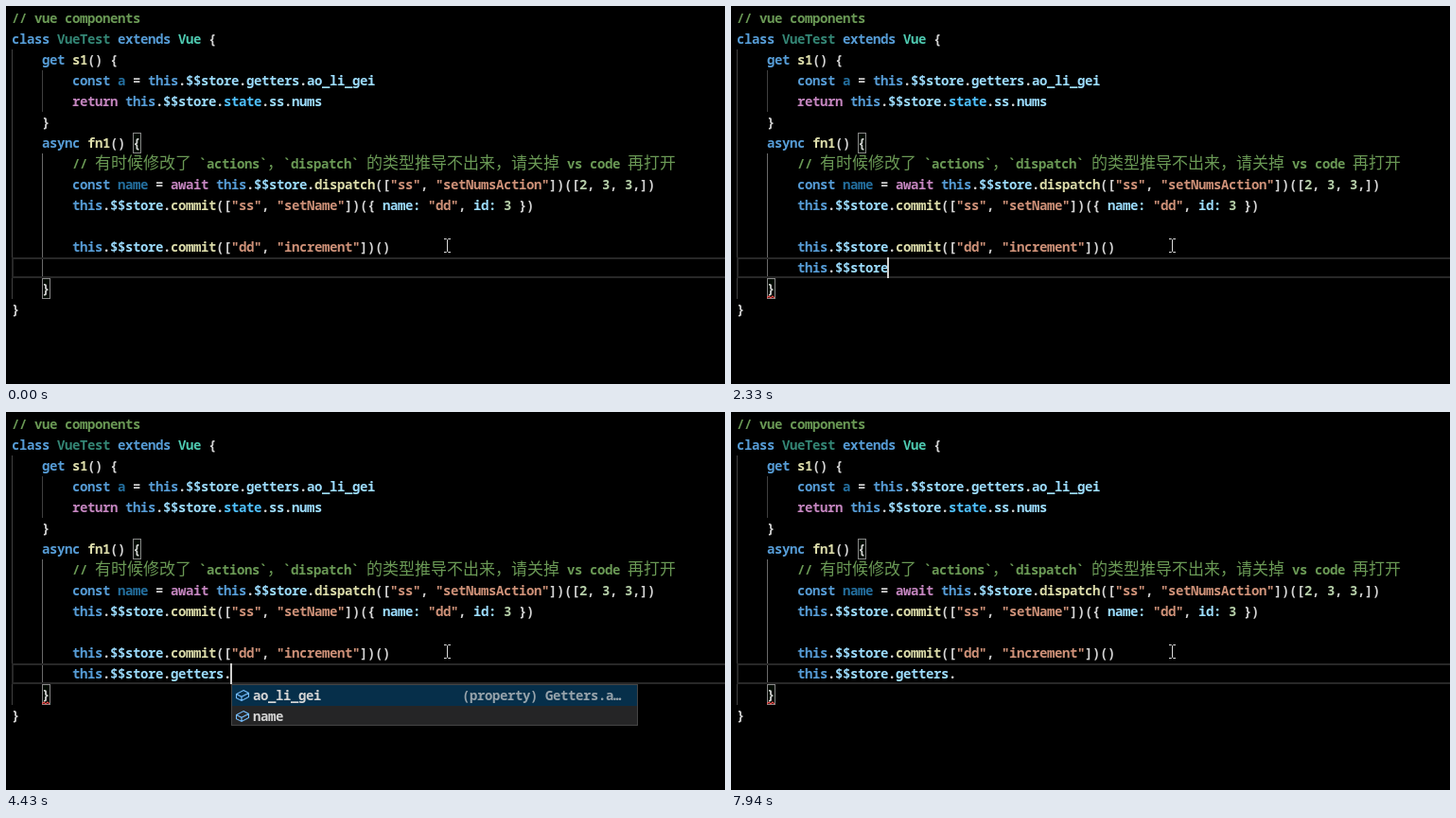
An HTML page for the animation above (8000 ms loop, 760 by 400 pixels).

```html
<!DOCTYPE html>
<html lang="zh-CN">
<head>
<meta charset="utf-8">
<title>Typed store completion</title>
<style>
html, body { margin: 0; width: 100%; height: 100%; overflow: hidden; background: #000; }
#stage {
  position: relative; width: 760px; height: 400px; overflow: hidden; background: #000; color: #d4d4d4;
  font: 700 14px/22px "Noto Sans Mono", "DejaVu Sans Mono", monospace;
  letter-spacing: -.4px; white-space: pre; font-variant-ligatures: none;
}
#stage > *, .row > * { position: absolute; }
#code { left: 6px; top: 2px; }
#code div { height: 22px; }
i { font-style: normal; }
.c { color: #6a9955; } .k { color: #569cd6; } .r { color: #c586c0; }
.t { color: #4ec9b0; } .f { color: #dcdcaa; } .v { color: #9cdcfe; }
.s { color: #ce9178; } .n { color: #b5cea8; } .o { color: #4fc1ff; }
.dim { opacity: .667; }
.d { color: #2470a0; }
.zh { font: 400 17px/0 "Noto Sans CJK SC", "Noto Sans CJK", sans-serif; letter-spacing: 0; }
.guide { width: 1px; background: #404040; }
.on { background: #6a6a6a; }
#current { left: 6px; top: 266px; width: 780px; height: 22px; box-sizing: border-box; border: 2px solid #282828; }
.match { width: 9px; height: 22px; box-sizing: border-box; border: 1px solid #888; background: rgba(0, 100, 0, .1); }
.word { width: 72px; height: 22px; background: rgba(87, 87, 87, .72); }
#typed { left: 70px; top: 266px; }
#caret { top: 266px; width: 2px; height: 22px; background: #d0d0ce; }
#squiggle { left: 38px; top: 306px; }
.popup {
  top: 288px; width: 430px; box-sizing: border-box; overflow: hidden;
  background: #252526; border: 1px solid #454545;
}
.row { position: relative; height: 22px; }
.row:first-child { background: #062f4a; }
.row svg { left: 3px; top: 3px; }
.label { left: 22px; }
.label i { color: #0097fb; }
.detail { left: 243px; opacity: .7; }
svg { fill: none; }
</style>
</head>
<body>
<div id="stage">
  <div class="guide" style="left:6px;top:46px;height:264px"></div>
  <div class="guide" style="left:38px;top:68px;height:44px"></div>
  <div class="guide on" style="left:38px;top:156px;height:132px"></div>
  <div id="current"></div>
  <div class="match" style="left:134px;top:134px"></div>
  <div class="match" style="left:38px;top:288px"></div>
  <div class="word" style="left:318px;top:68px"></div>
  <div class="word" style="left:238px;top:266px"></div>
  <div id="code"><div class="c">// vue components</div><div><i class="k">class</i> <i class="t dim" id="name">VueTest</i> <i class="k">extends</i> <i class="t">Vue</i> {</div><div>    <i class="k">get</i> <i class="f">s1</i>() {</div><div>        <i class="k">const</i> <i class="d">a</i> = <i class="k">this</i>.<i class="v">$$store</i>.<i class="v">getters</i>.<i class="v">ao_li_gei</i></div><div>        <i class="r">return</i> <i class="k">this</i>.<i class="v">$$store</i>.<i class="o">state</i>.<i class="v">ss</i>.<i class="v">nums</i></div><div>    }</div><div>    <i class="k">async</i> <i class="f">fn1</i>() {</div><div class="c">        // <i class="zh">有时候修改了</i> `actions`<i class="zh">，</i>`dispatch` <i class="zh">的类型推导不出来，请关掉</i> vs code <i class="zh">再打开</i></div><div>        <i class="k">const</i> <i class="d">name</i> = <i class="r">await</i> <i class="k">this</i>.<i class="v">$$store</i>.<i class="f">dispatch</i>([<i class="s">"ss"</i>, <i class="s">"setNumsAction"</i>])([<i class="n">2</i>, <i class="n">3</i>, <i class="n">3</i>,])</div><div>        <i class="k">this</i>.<i class="v">$$store</i>.<i class="f">commit</i>([<i class="s">"ss"</i>, <i class="s">"setName"</i>])({ <i class="v">name:</i> <i class="s">"dd"</i>, <i class="v">id:</i> <i class="n">3</i> })</div><div></div><div>        <i class="k">this</i>.<i class="v">$$store</i>.<i class="f">commit</i>([<i class="s">"dd"</i>, <i class="s">"increment"</i>])()</div><div></div><div>    }</div><div>}</div></div>
  <div id="typed"></div>
  <svg id="squiggle" width="8" height="4"><path d="M0 3 L2 1 L4 3 L6 1 L8 3" stroke="#f14c4c" stroke-width="1.2"/></svg>
  <div id="caret"></div>
  <svg style="left:461px;top:245px" width="11" height="17"><path d="M2 1.5H4.5L5.5 2.5L6.5 1.5H9M5.5 2.5V14.5M2 15.5H4.5L5.5 14.5L6.5 15.5H9" stroke="#ddd"/></svg>
</div>
<script>
const stage = document.getElementById('stage');
const $ = id => document.getElementById(id);

const icon = (color, d) =>
  `<svg width="16" height="16" viewBox="0 0 16 16"><path d="${d}" stroke="${color}" stroke-width="1.1"/></svg>`;
const icons = {
  k: icon('#c5c5c5', 'M1 3.5H6M8 3.5H15M1 6.5H10M12 6.5H14M1 9.5H4M6 9.5H14M1 12.5H9M11 12.5H15'),
  n: icon('#c5c5c5', 'M5.5 2.5Q3.5 2.5 3.5 4.5V6.5L1.5 8L3.5 9.5V11.5Q3.5 13.5 5.5 13.5M10.5 2.5Q12.5 2.5 12.5 4.5V6.5L14.5 8L12.5 9.5V11.5Q12.5 13.5 10.5 13.5'),
  v: icon('#75beff', 'M4 3.5H1.5V12.5H4M12 3.5H14.5V12.5H12M9 5L12 6.5V8.5L7.5 11L4.5 9.5V7.5ZM4.5 7.5L7.5 9L12 6.5M7.5 9V11'),
  p: icon('#75beff', 'M9 2.5L14.5 5.3V9.5L7 13.5L1.5 10.7V6.5ZM1.5 6.5L7 9.3L14.5 5.3M7 9.3V13.5'),
  m: icon('#b180d7', 'M8 1.5L13.5 4.5V11L8 14.5L2.5 11V4.5ZM2.5 4.5L8 7.8L13.5 4.5M8 7.8V14.5')
};

// Each item is "icon:label"; brackets mark the matched letters.
const lists = {
  th: ['this', 'k:[th]is k:[th]row n:global[Th]is v:[T]ouc[h] v:[T]ouc[h]Event v:[T]ouc[h]List'],
  thi: ['this', 'k:[thi]s n:global[Thi]s v:[T]ouc[h]L[i]st'],
  full: ['this', 'k:[this] n:global[This] v:[T]ouc[h]L[is]t'],
  self: ['(property) VueTest.$…', 'p:$$store p:$attrs p:$children p:$createElement p:$data m:$delete'],
  store: ['(property) SStore<Re…', 'p:commit p:dispatch p:getters m:hasModule m:hotUpdate m:registerModule'],
  g: ['(property) SStore<Re…', 'p:[g]etters m:re[g]isterModule m:unre[g]isterModule'],
  ge: ['(property) SStore<Re…', 'p:[ge]tters m:re[g]ist[e]rModule m:unre[g]ist[e]rModule'],
  get: ['(property) SStore<Re…', 'p:[get]ters m:re[g]ist[e]rModule m:unre[g]ist[e]rModule'],
  getters: ['(property) Getters.a…', 'p:ao_li_gei p:name'],
  num: ['(method) Number.toEx…', 'm:toExponential m:toFixed m:toLocaleString m:toPrecision m:toString m:valueOf']
};

const popups = {};
for (const [key, [detail, items]] of Object.entries(lists)) {
  const rows = items.split(' ');
  const box = document.createElement('div');
  box.className = 'popup';
  box.style.height = rows.length * 22 + 'px';
  box.innerHTML = rows.map((item, n) => {
    const label = item.slice(2).replace(/\[/g, '<i>').replace(/\]/g, '</i>');
    const left = detail === 'this' ? ' style="left:386px"' : '';
    const note = n ? '' : `<span class="detail"${left}>${detail.replace('<', '&lt;')}</span>`;
    return `<div class="row">${icons[item[0]]}<span class="label">${label}</span>${note}</div>`;
  }).join('');
  popups[key] = stage.appendChild(box);
}

const S = 'this.$$store', G = S + '.getters', A = G + '.ao_li_gei';
// time, text, caret, popup, flags: e = error squiggle, b = bright class name, w = word highlight
const steps = [
  [0, '', 0, '', ''],
  [530, '', 1, '', ''],
  [1000, '', 0, '', ''],
  [1150, 't', 1, '', ''],
  [1310, 'th', 1, 'th', ''],
  [1390, 'thi', 1, 'thi', ''],
  [1460, 'this', 1, 'full', ''],
  [1620, 'this.', 1, '', ''],
  [1700, 'this.', 1, 'self', ''],
  [2010, 'this.', 1, 'self', 'b'],
  [2090, 'this.', 1, 'self', 'be'],
  [2170, 'this.', 0, 'self', 'e'],
  [2330, S, 1, '', 'e'],
  [2560, S + '.', 1, '', 'e'],
  [2640, S + '.', 1, 'store', 'e'],
  [3030, S + '.', 0, 'store', 'e'],
  [3570, S + '.g', 1, 'g', 'e'],
  [3730, S + '.ge', 1, 'ge', 'e'],
  [3880, S + '.get', 1, 'get', 'e'],
  [4120, G, 1, '', 'e'],
  [4430, G + '.', 1, 'getters', 'e'],
  [4900, G + '.', 0, 'getters', 'e'],
  [5370, G + '.', 1, 'getters', 'e'],
  [5520, A, 1, '', 'e'],
  [5910, A, 1, '', 'b'],
  [6060, A + '.', 1, '', 'b'],
  [6140, A + '.', 1, 'num', 'b'],
  [6450, A + '.', 1, 'num', 'e'],
  [6530, A + '.', 0, 'num', 'e'],
  [7000, A, 1, '', 'e'],
  [7310, A, 1, '', 'bw'],
  [7390, G + '.', 1, '', 'b'],
  [7860, G + '.', 1, '', 'be'],
  [7940, G + '.', 0, '', 'e']
];

const paint = text => text.split('.')
  .map(w => `<i class="${w === 'this' ? 'k' : 'v'}">${w}</i>`).join('.');
const show = (el, on) => { el.style.visibility = on ? 'visible' : 'hidden'; };

let last;
function draw(now) {
  const t = now % 8000;
  const step = steps.filter(s => s[0] <= t).pop();
  if (step !== last) {
    last = step;
    const [, text, caret, popup, flags] = step;
    const x = 70 + text.length * 8;
    $('typed').innerHTML = paint(text);
    $('caret').style.left = x - 1 + 'px';
    show($('caret'), caret);
    show($('squiggle'), flags.includes('e'));
    $('name').classList.toggle('dim', !flags.includes('b'));
    document.querySelectorAll('.word').forEach(el => show(el, flags.includes('w')));
    for (const key in popups) {
      popups[key].style.left = x + 'px';
      show(popups[key], key === popup);
    }
  }
}
const start = performance.now();
function tick() {
  draw(performance.now() - start);
  requestAnimationFrame(tick);
}
tick();
</script>
</body>
</html>
```
